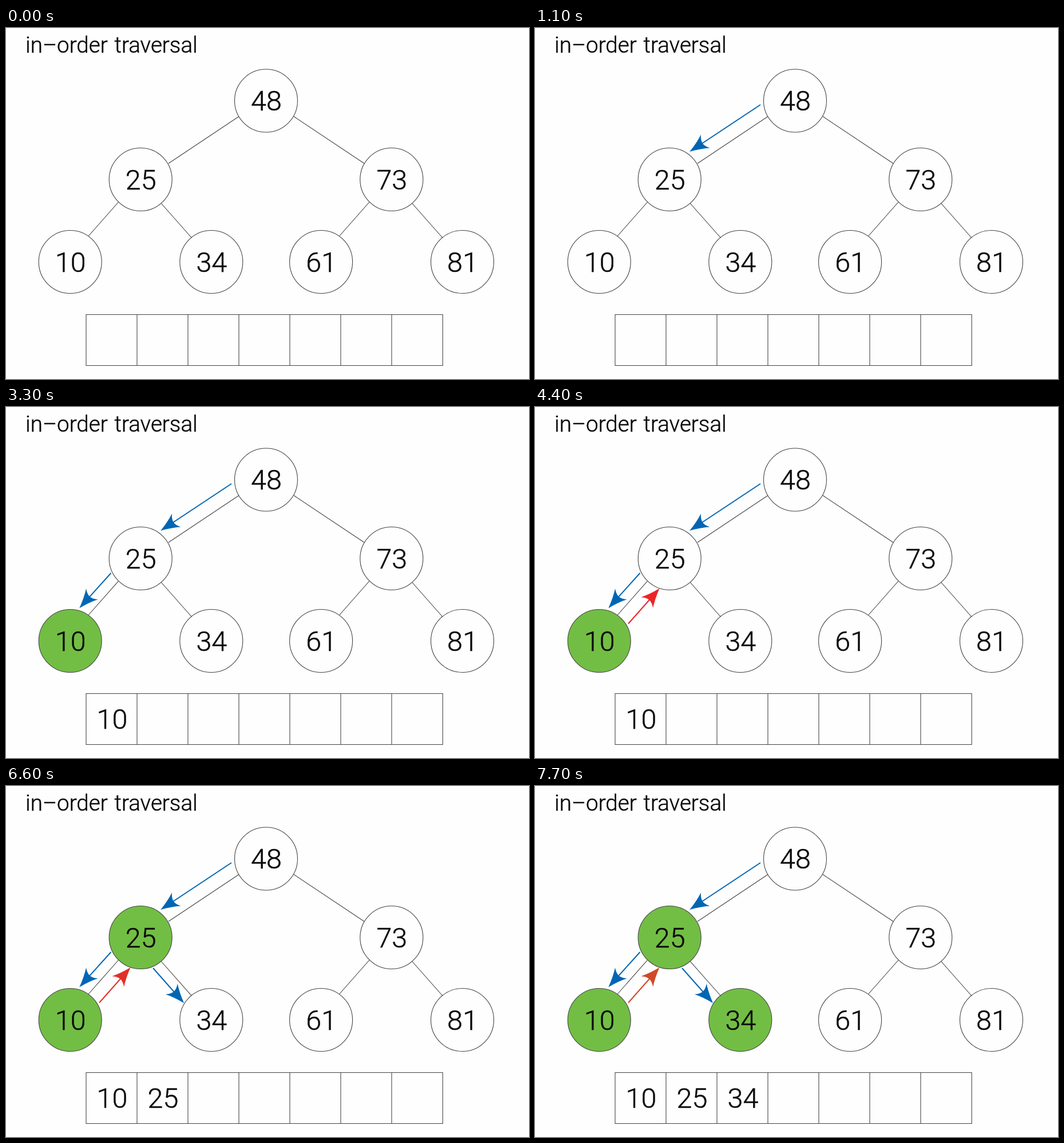
Recreate the animation shown at these times as an HTML page. Size 914 by 613 pixels, loop 8 s.

```html
<!DOCTYPE html>
<html lang="en">
<head>
<meta charset="utf-8">
<title>In-order traversal</title>
<style>
  html, body { margin: 0; width: 100%; height: 100%; overflow: hidden; background: #fefefe; }
  svg { display: block; }
  text {
    font: 300 48.5px Roboto, "Noto Sans", sans-serif; text-anchor: middle;
    fill: #0a0a0a; stroke: #0a0a0a; stroke-width: 0.5;
  }
  .title { font-size: 38.6px; text-anchor: start; word-spacing: 2.5px; }
  .outline { fill: none; stroke: #444; stroke-width: 1.1; }
  .arrow { fill: currentColor; stroke: none; }
  .arrow line { stroke: currentColor; stroke-width: 2; }
</style>
</head>
<body>
<svg id="stage" width="914" height="613" viewBox="0 0 914 613">
  <text class="title" x="34" y="43">in–order traversal</text>
</svg>
<script>
const LOOP = 8000, STEP = 1100;
const GREEN = '#72be44', BLUE = '#0066b3';
const REDS = ['#ed2426', '#e6261f', '#e03127', '#cf4927'];
const RED_START = 4;
const stage = document.getElementById('stage');

// Everything registered here becomes visible at its step.
const timed = [];

function add(tag, attributes, parent = stage) {
  const node = document.createElementNS('http://www.w3.org/2000/svg', tag);
  for (const name in attributes) node.setAttribute(name, attributes[name]);
  return parent.appendChild(node);
}

function label(value, x, y) {
  const node = add('text', { x, y });
  node.textContent = value;
  return node;
}

function showFrom(step, node) {
  timed.push({ step, node });
  return node;
}

function arrow(step, x1, y1, x2, y2, color) {
  const length = Math.hypot(x2 - x1, y2 - y1);
  const angle = Math.atan2(y2 - y1, x2 - x1) * 180 / Math.PI;
  const group = add('g', {
    class: 'arrow', color, transform: `translate(${x2} ${y2}) rotate(${angle})`
  });
  add('line', { x1: -length, y1: 0, x2: -24, y2: 0 }, group);
  add('path', { d: 'M1 0Q-18 -6 -32 -14Q-26 -6 -26 0Q-26 6 -32 14Q-18 6 1 0Z' }, group);
  return showFrom(step, group);
}

// value, centre, and the step at which the node is visited
const nodes = [
  [48, 454.5, 127], [25, 235.2, 264.5, 5], [73, 673.8, 264.5],
  [10, 112.2, 408.5, 3], [34, 358.8, 408.5, 7], [61, 550.6, 408.5], [81, 797.5, 408.5]
];
for (const [value, cx, cy, step] of nodes) {
  if (step) showFrom(step, add('circle', { cx, cy, r: 55, fill: GREEN }));
  add('circle', { class: 'outline', cx, cy, r: 55 });
  label(value, cx + 0.5, cy + 17);
}

add('path', {
  class: 'outline',
  d: 'M407 154.5L284 236.5M503 154.5L626 236.5M196.5 304L144 363.5M271 306L324.5 366.5M635 304L582.5 363.5M709.5 306L763 366.5'
});

add('path', { class: 'outline', d: 'M140 500.5H763.2V589.5H140Z' });
for (let i = 1; i < 7; i++) {
  add('path', { class: 'outline', d: `M${140 + 89 * i} 500.5V589.5` });
}
[[10, 3], [25, 5], [34, 7]].forEach(([value, step], i) =>
  showFrom(step, label(value, 185.5 + 89 * i, 561.5)));

arrow(1, 394, 134, 271, 215.5, BLUE);
arrow(2, 183.5, 290, 129, 350.5, BLUE);
const returnArrow = arrow(RED_START, 163, 378.5, 217, 317.5, REDS[0]);
arrow(6, 257, 318, 310.5, 378.5, BLUE);

function draw(now) {
  const current = Math.floor(now % LOOP / STEP);
  for (const { step, node } of timed) {
    node.setAttribute('visibility', current >= step ? 'visible' : 'hidden');
  }
  returnArrow.setAttribute('color', REDS[Math.max(0, current - RED_START)]);
}

const start = performance.now();
function tick() {
  draw(performance.now() - start);
  requestAnimationFrame(tick);
}
tick();
</script>
</body>
</html>
```
